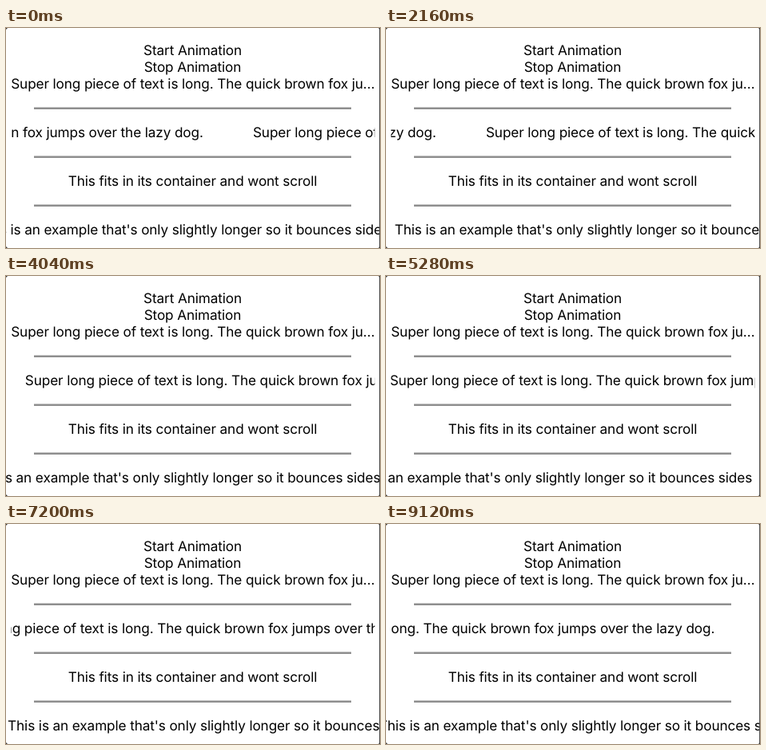
Animation, 468 px wide and 276 px high, one loop 9.16 s. Source, as an HTML page:

```html
<!DOCTYPE html>
<html lang="en">
<head>
<meta charset="utf-8">
<title>Text ticker</title>
<style>
  html, body { margin: 0; width: 100%; height: 100%; overflow: hidden; background: #fff; }
  svg { display: block; }
  text {
    font: 400 17.2px Inter, Roboto, sans-serif;
    letter-spacing: -0.12px;
    text-rendering: geometricPrecision;
    fill: #000;
  }
  .mid { text-anchor: middle; }
  .rule { stroke: #8e8e8e; stroke-width: 2.5; }
</style>
</head>
<body>
<svg width="468" height="276" viewBox="0 0 468 276">
  <defs>
    <clipPath id="window"><rect x="6.3" y="115" width="455.2" height="32"/></clipPath>
  </defs>

  <text class="mid" x="233.5" y="34">Start Animation</text>
  <text class="mid" x="233.5" y="55">Stop Animation</text>
  <text x="6.2" y="76">Super long piece of text is long. The quick brown fox ju…</text>

  <path class="rule" d="M35 100.75H432M35 161.75H432M35 222.75H432"/>

  <g clip-path="url(#window)">
    <g id="scroll">
      <text x="6.2" y="137">Super long piece of text is long. The quick brown fox jumps over the lazy dog.</text>
      <text x="691.2" y="137">Super long piece of text is long. The quick brown fox jumps over the lazy dog.</text>
    </g>
  </g>

  <text class="mid" x="233.5" y="198">This fits in its container and wont scroll</text>

  <text id="bounce" x="6.3" y="259">This is an example that's only slightly longer so it bounces sides</text>

  <rect x="467" width="1" height="276" fill="#555"/>
  <path d="M0 0H2L0 2ZM468 0V2L466 0ZM0 276V274L2 276ZM468 276H466L468 274Z" fill="#333"/>
</svg>
<script>
  const LOOP = 9160, STEP = 40;
  const scroll = { el: document.getElementById('scroll'), start: 5015, time: 10800, travel: 685 };
  const bounce = { el: document.getElementById('bounce'), start: 1840, time: 3060, travel: 70.5, top: 6.8 };

  const mod = (a, b) => ((a % b) + b) % b;

  // cubic-bezier(.42, 0, 1, 1)
  function easeIn(x) {
    let lo = 0, hi = 1;
    for (let i = 0; i < 24; i++) {
      const s = (lo + hi) / 2;
      const bx = 1.26 * s * (1 - s) ** 2 + 3 * s * s - 2 * s ** 3;
      if (bx < x) lo = s; else hi = s;
    }
    return 3 * lo * lo - 2 * lo ** 3;
  }

  const easeInOut = p => p < 0.5 ? easeIn(2 * p) / 2 : 1 - easeIn(2 - 2 * p) / 2;

  const shift = (el, x) => el.setAttribute('transform', `translate(${x.toFixed(2)} 0)`);

  function draw(t) {
    const p = mod(t - scroll.start, scroll.time) / scroll.time;
    shift(scroll.el, -scroll.travel * easeInOut(p));

    const u = mod(t - bounce.start, 2 * bounce.time) / bounce.time;
    shift(bounce.el, bounce.top - bounce.travel * easeInOut(u < 1 ? u : 2 - u));
  }

  const begin = performance.now();
  function tick() {
    const t = (performance.now() - begin) % LOOP;
    draw(Math.floor(t / STEP) * STEP);
    requestAnimationFrame(tick);
  }
  tick();
</script>
</body>
</html>
```
